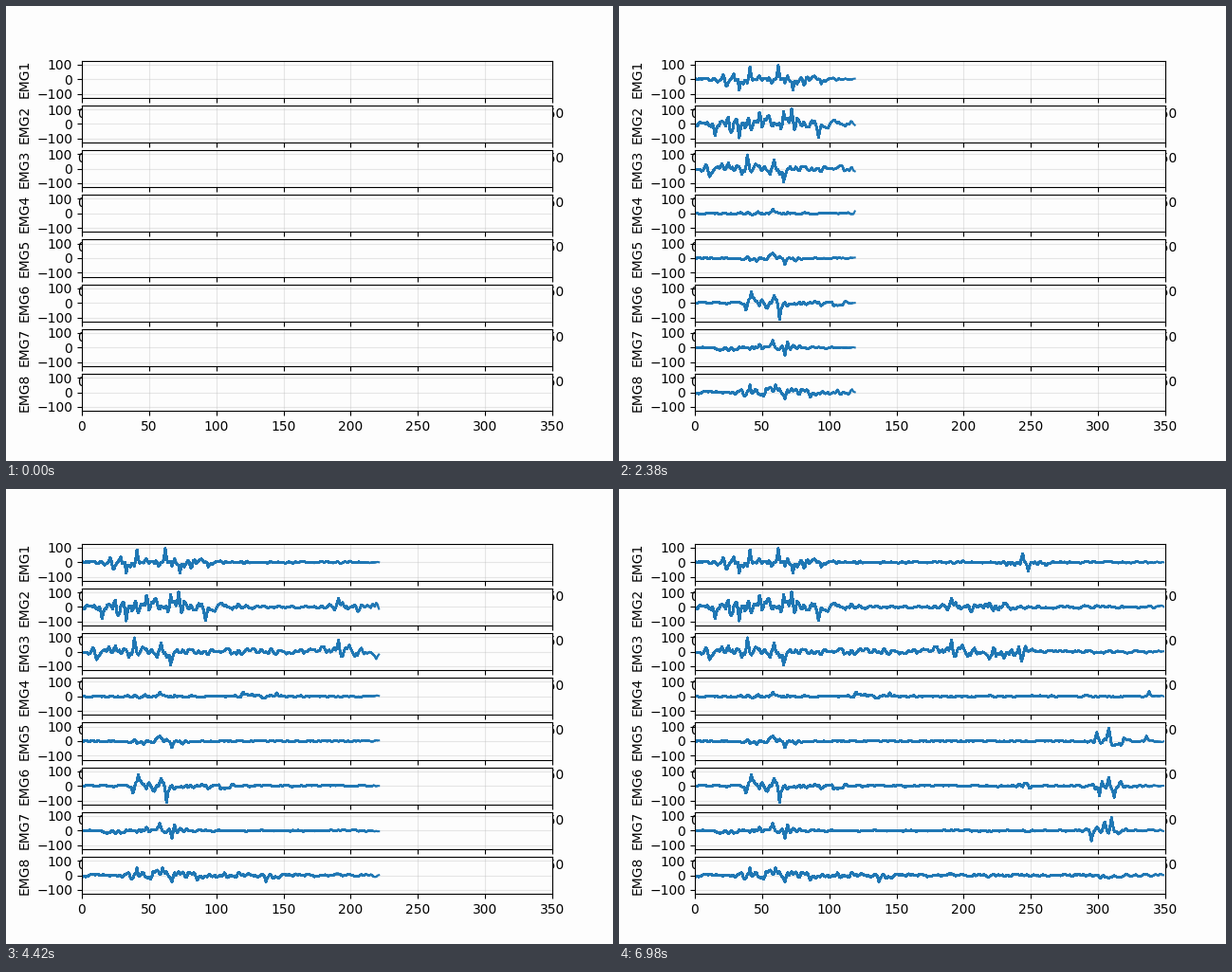
These frames come from a looping animation (640x480 px, 7 s). A matplotlib script:

```python
import numpy as np
import matplotlib.pyplot as plt
from matplotlib.animation import FuncAnimation
from matplotlib.lines import Line2D

N = 350
BLUE = (31, 119, 180)
PAPER = "#fdfdfd"
t = np.arange(N)


def plateau(start, stop):
    """Soft-edged window that is 1 between start and stop."""
    return (np.tanh((t - start) / 5) - np.tanh((t - stop) / 5)) / 2


def signal(seed, rest, bursts, peaks):
    """Muscle signal: seeded noise, louder in bursts, with a few strong peaks."""
    rng = np.random.default_rng(seed)
    noise = np.convolve(rng.normal(size=N + 2), [0.35, 0.9, 0.35], "valid")
    level = rest + sum(gain * plateau(a, b) for a, b, gain in bursts)
    y = np.clip(noise, -2, 2) * level
    for x, height in peaks:
        blend = np.exp(-((t - x) ** 2))
        y += (height - y) * blend
    return np.round(y)


channels = [
    signal(1, 4, [(9, 98, 18), (232, 262, 15)],
           [(33, -75), (41, 85), (62, 95), (73, -75), (244, 60), (248, -60)]),
    signal(2, 5, [(8, 96, 24), (96, 125, 8), (182, 235, 10)],
           [(15, -80), (33, -95), (48, 80), (66, 85), (72, 105), (92, -95),
            (191, 60)]),
    signal(3, 5, [(8, 72, 16), (72, 180, 6), (180, 248, 20)],
           [(11, -55), (39, 95), (59, 60), (66, -90), (191, 80), (243, -65)]),
    signal(4, 3, [(36, 70, 5), (108, 160, 4)],
           [(58, 30), (120, 30), (145, 25), (338, 35)]),
    signal(5, 3, [(36, 78, 9), (297, 320, 15)],
           [(58, 35), (67, -45), (299, 60), (308, 90), (336, 35)]),
    signal(6, 3, [(36, 75, 16), (75, 112, 7), (240, 252, 8), (295, 320, 16)],
           [(38, -50), (42, 75), (59, 50), (63, -115), (301, -70), (308, 60),
            (312, -80)]),
    signal(7, 3, [(17, 85, 9), (295, 320, 15)],
           [(58, 50), (67, -55), (69, 40), (295, -70), (305, 60), (310, 90)]),
    signal(8, 5, [(36, 72, 13), (72, 150, 6), (300, 312, 7)],
           [(41, 50), (60, 50), (67, -45), (86, -35), (137, -45)]),
]

fig, axes = plt.subplots(8, 1, figsize=(6.4, 4.8), dpi=100, facecolor=PAPER)
for i, ax in enumerate(axes, 1):
    ax.set(facecolor=PAPER, xlim=(0, N), ylim=(-128, 128),
           yticks=(-100, 0, 100), ylabel=f"EMG{i}")
    ax.grid(alpha=0.3)


def snapshot():
    fig.canvas.draw()
    return np.asarray(fig.canvas.buffer_rgba())[..., :3].astype(np.float32)


# Every step strokes the whole trace again, so soft edges build up with age.
base = snapshot()
for ax, y in zip(axes, channels):
    ax.plot(t, y, color="C0")
full = snapshot()

red = base[..., 0]
ink = np.where(red > 150, (red - full[..., 0]) / np.maximum(red - BLUE[0], 1), 0)
clear = 1 - np.clip(ink, 0, 1)
blue = np.array(BLUE, np.float32)
left, right = axes[0].bbox.x0, axes[0].bbox.x1
cols = np.arange(base.shape[1]) + 0.5
col_step = np.ceil((cols - left) / (right - left) * N)
panels = [(ax.transData.frozen(), ax.bbox.frozen().padded(-1)) for ax in axes]

fig.clear()
picture = fig.figimage(base.astype(np.uint8))
lines = []
for trans, box in panels:
    line = Line2D([], [], color="C0", lw=1.5, transform=trans)
    line.set_clip_box(box)
    lines.append(fig.add_artist(line))


def update(n):
    strokes = np.clip(n - col_step, 0, None)
    keep = (clear ** strokes)[..., None]
    picture.set_data(np.round(blue + (base - blue) * keep).astype(np.uint8))
    stop = n + 1 if n else 0
    for line, y in zip(lines, channels):
        line.set_data(t[:stop], y[:stop])
    return [picture, *lines]


anim = FuncAnimation(fig, update, frames=N, interval=20, repeat=True)
plt.show()
```
